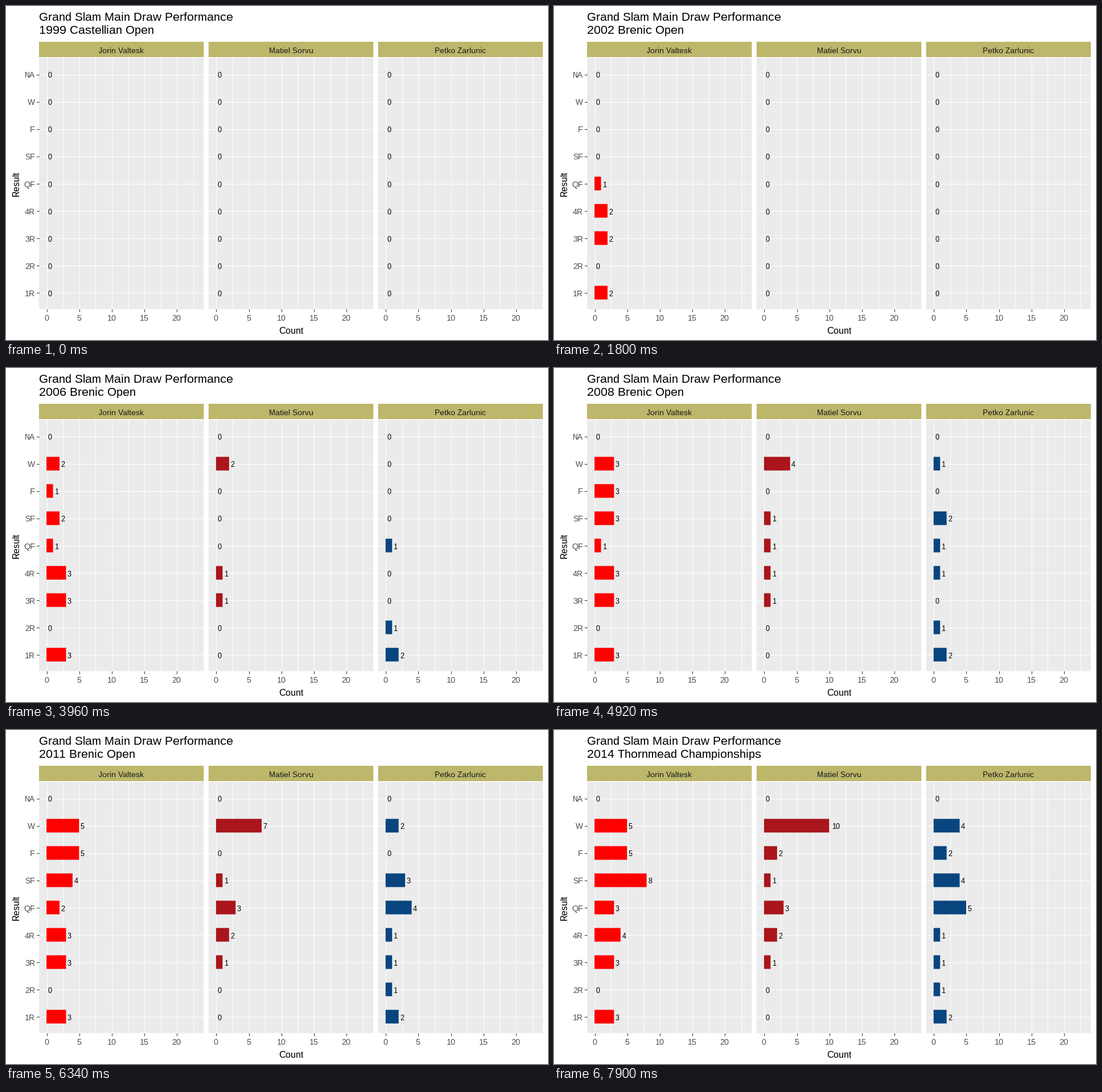
Recreate the animation shown at these times as a matplotlib script. Size 952 px wide and 588 px high, loop 8 s.

```python
import matplotlib as mpl
import matplotlib.pyplot as plt
import numpy as np
from matplotlib.animation import FuncAnimation
from matplotlib.patches import Rectangle

mpl.rcParams.update({
    "font.family": "Liberation Sans",
    "text.hinting": "native",
    "text.hinting_factor": 1,
})

WIDTH, HEIGHT, DPI = 952, 588, 64
PX = 72 / DPI
INTERVAL, FRAMES = 20, 400

# Panel geometry in pixels, y pointing down
PANEL_LEFT, PANEL_WIDTH, PITCH = 58, 289.4, 297.8
STRIP_TOP, STRIP_BOTTOM, PANEL_TOP, PANEL_BOTTOM = 63, 90, 91.5, 533.5
UNIT = PANEL_WIDTH / 1.1 / 23
ZERO = PANEL_LEFT + PANEL_WIDTH / 22
FIRST_ROW, ROW_STEP, BAR_HALF = 504.65, 48.03, 12.01

LEVELS = ["1R", "2R", "3R", "4R", "QF", "SF", "F", "W", "NA"]
EVENTS = ["Castellian Open", "Brenic Open",
          "Thornmead Championships", "KV Open (tennis)"]

# One letter per result in the first two events of each year, "-" if absent
PLAYERS = [
    ("Jorin Valtesk", "#FF0000", "-1343Q4141W3SSWFWFSFFWWQSFSSSQS4"),
    ("Matiel Sorvu", "#AA151B", "-" * 10 + "3-4W-WQWSWW4QWQWFW-WFW"),
    ("Petko Zarlunic", "#08457E", "-" * 12 + "121Q4SWSQ3QQWSWFWSQF"),
]
STATES = 63
MOVE = 3  # frames in which bars grow towards the next event

# Frame at which each event is reached
steps = np.full(STATES, 6)
steps[0] = 0
steps[2:26] = 7
steps[47] = 5
ARRIVAL = np.cumsum(steps)


def running_counts():
    counts = np.zeros((STATES, len(PLAYERS), len(LEVELS)))
    for p, (_, _, results) in enumerate(PLAYERS):
        for i, letter in enumerate(results):
            if letter != "-":
                state = i // 2 * 4 + i % 2
                counts[state:, p, "1234QSFW".index(letter)] += 1
    return counts


COUNTS = running_counts()


def row_y(level):
    return FIRST_ROW - level * ROW_STEP


def x_at(panel, value):
    return ZERO + panel * PITCH + value * UNIT


def mid_pixel(v):
    return np.floor(v) + 0.5


fig = plt.figure(figsize=(WIDTH / DPI, HEIGHT / DPI), dpi=DPI, facecolor="white")
ax = fig.add_axes([0, 0, 1, 1])
ax.set_xlim(0, WIDTH)
ax.set_ylim(HEIGHT, 0)
ax.set_axis_off()


def box(x0, y0, x1, y1, color, z=1):
    rect = Rectangle((x0, y0), x1 - x0, y1 - y0, facecolor=color,
                     linewidth=0, snap=False, zorder=z)
    return ax.add_patch(rect)


def write(x, y, text, size, color="black", ha="left", **kw):
    return ax.text(x, y, text, fontsize=size * PX, color=color, ha=ha,
                   va="baseline", zorder=5, **kw)


def line_set(draw, *args, color):
    draw(*args, colors=color, linewidth=PX, antialiased=False, zorder=2)


rows = np.array([row_y(i) for i in range(len(LEVELS))])
row_lines = mid_pixel(rows)
bars, labels = [], []

for p, (name, color, _) in enumerate(PLAYERS):
    left = PANEL_LEFT + p * PITCH
    right = left + PANEL_WIDTH
    box(left, STRIP_TOP, right, STRIP_BOTTOM, "#BDB76B")
    box(left, PANEL_TOP, right, PANEL_BOTTOM, "#EBEBEB")
    write((left + right) / 2, 83, name, 14, "#1A1A1A", "center")

    grid = mid_pixel(x_at(p, np.arange(0, 23, 2.5)))
    line_set(ax.vlines, grid, PANEL_TOP, PANEL_BOTTOM, color="white")
    line_set(ax.hlines, row_lines, left, right, color="white")
    line_set(ax.vlines, grid[::2], 534, 538, color="#333333")
    for value, x in zip(range(0, 21, 5), grid[::2]):
        write(x, 554, str(value), 14, "#4D4D4D", "center")

    for y in rows:
        bars.append(box(x_at(p, 0), y - BAR_HALF,
                        x_at(p, 0), y + BAR_HALF, color, 3))
        labels.append(write(0, round(y + 6), "0", 13.3))

line_set(ax.hlines, row_lines, 54, 58, color="#333333")
for level, y in zip(LEVELS, rows):
    write(51, round(y + 6), level, 14.3, "#4D4D4D", "right")

write(58, 26, "Grand Slam Main Draw Performance", 20.75)
subtitle = write(58, 49, "", 20.75)
write(500.5, 577, "Count", 17.4, ha="center")
write(23, 313, "Result", 17.4, ha="center", rotation=90, rotation_mode="anchor")


def update(frame):
    state = np.searchsorted(ARRIVAL, frame, side="right") - 1
    values = COUNTS[state]
    if state + 1 < STATES:
        progress = max(0, 1 - (ARRIVAL[state + 1] - frame) / MOVE)
        values = values + (COUNTS[state + 1] - values) * progress
    subtitle.set_text(f"{1999 + state // 4} {EVENTS[state % 4]}")

    for i, value in enumerate(values.flat):
        end = x_at(i // len(LEVELS), value)
        text = str(round(value))
        bars[i].set_width(value * UNIT)
        labels[i].set_text(text)
        labels[i].set_x(end + 2.35 * len(text))
    return [subtitle, *bars, *labels]


anim = FuncAnimation(fig, update, frames=FRAMES, interval=INTERVAL,
                     repeat=True, repeat_delay=0, cache_frame_data=False)
plt.show()
```
